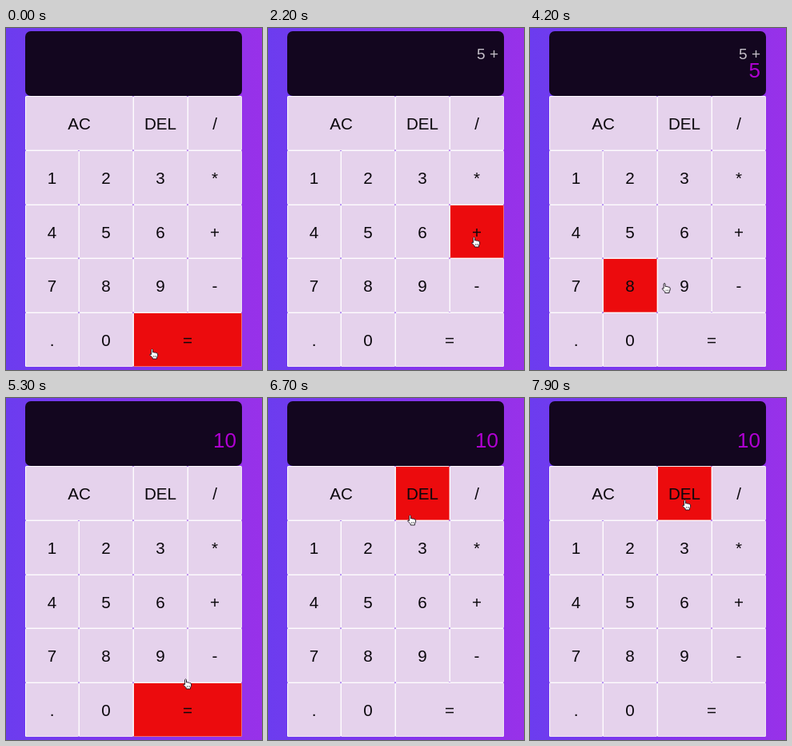
Recreate the animation shown at these times as an HTML page. Size 320 px wide and 428 px high, loop 8 s.

```html
<!DOCTYPE html>
<html lang="en">
<head>
<meta charset="utf-8">
<title>Calculator</title>
<style>
  html, body { margin: 0; width: 100%; height: 100%; overflow: hidden; }
  body {
    position: relative;
    background: linear-gradient(to right, #6c3cef, #9831e9);
    font-family: "Liberation Sans", Arial, sans-serif;
  }
  #screen {
    position: absolute; left: 24px; top: 4px; width: 271px; height: 81px;
    border-radius: 7px; background: #13061f;
  }
  #screen div { position: absolute; right: 7px; white-space: pre; line-height: 30px; }
  #prev { top: 14px; font-size: 19px; color: #c4bfc8; }
  #cur { top: 34px; font-size: 26px; color: #b000d2; }
  .key {
    position: absolute; box-sizing: border-box;
    border: 1px solid; border-color: #fffe #fff6 #fff6 #fffe; border-radius: 1.5px;
    background: #e5d2ec; color: #0b080c;
    font-size: 20.6px; line-height: 67px; text-align: center;
  }
  .key.hover { background: #ec0b0d; }
  #hand { position: absolute; left: 0; top: 0; width: 12px; height: 14px; overflow: visible; }
</style>
</head>
<body>
<div id="screen"><div id="prev"></div><div id="cur"></div></div>
<svg id="hand" viewBox="0 0 12 14">
  <path d="M2.6 1.6Q3.5 0 4.5 1.6V5Q5.6 4.2 6.4 5.2Q7.6 4.6 8.4 5.7Q10.4 5.2 10.6 7V9.4L9.5 11.4V13H4.2V11.7L.8 8.2Q.3 6.5 2.6 7.5Z"
    fill="#fff" stroke="#17101c" stroke-width=".9" stroke-linejoin="round"/>
  <path d="M5.4 9V11M7 9V11M8.6 9V11" stroke="#17101c" stroke-width=".5"/>
</svg>
<script>
const LOOP = 8000, STEP = 100, SIZE = 67.8, LEFT = 23.6, TOP = 84.95;
const $ = id => document.getElementById(id);

// Pointer stops: time, x, y of the fingertip
const stops = [
  [0, 182.5, 402.5], [1200, 137.5, 272.5], [2200, 257.5, 262.5], [3100, 80, 314],
  [3300, 96.5, 317.5], [3800, 128, 270], [4700, 224, 390], [5000, 224, 390],
  [5300, 224.5, 352.5], [6700, 177.5, 147.5], [7900, 193.5, 128.5]
];
const presses = [[1400, "5"], [2100, "+"], [3900, "5"], [4800, "="]];

const rows = ["AC AC DEL /", "1 2 3 *", "4 5 6 +", "7 8 9 -", ". 0 = ="].map(r => r.split(" "));
const edgeX = col => Math.round(LEFT + col * SIZE);
const edgeY = row => Math.round(TOP + row * SIZE);

const keys = {};
rows.forEach((row, y) => new Set(row).forEach(label => {
  const key = keys[label] = document.createElement("div");
  const x = edgeX(row.indexOf(label)), end = edgeX(row.lastIndexOf(label) + 1);
  key.className = "key";
  key.textContent = label;
  Object.assign(key.style, {
    left: x + "px", width: end - x + "px",
    top: edgeY(y) + "px", height: edgeY(y + 1) - edgeY(y) + "px"
  });
  document.body.insertBefore(key, $("hand"));
}));

const ease = k => k * k * (3 - 2 * k);

function tipAt(t) {
  const i = stops.findIndex(s => s[0] > t);
  if (i < 0) return stops[stops.length - 1].slice(1);
  const [t0, x0, y0] = stops[i - 1], [t1, x1, y1] = stops[i];
  const k = ease((t - t0) / (t1 - t0));
  return [x0 + (x1 - x0) * k, y0 + (y1 - y0) * k];
}

function displayAt(t) {
  let prev = "", cur = "";
  for (const [time, key] of presses) {
    if (time > t) break;
    if (key === "+") [prev, cur] = [cur + " +", ""];
    else if (key === "=") [prev, cur] = ["", String(parseFloat(prev) + parseFloat(cur))];
    else cur += key;
  }
  return [prev, cur];
}

function draw(t) {
  const [x, y] = tipAt(t);
  $("hand").style.transform = `translate(${x - 3.5}px, ${y - 1.5}px)`;

  // The highlight trails the pointer by one step.
  const [hx, hy] = tipAt(Math.max(0, t - STEP));
  const hot = rows[Math.floor((hy - TOP) / SIZE)][Math.floor((hx - LEFT) / SIZE)];
  for (const label in keys) keys[label].classList.toggle("hover", label === hot);

  [$("prev").textContent, $("cur").textContent] = displayAt(t);
}

const start = performance.now();
function tick() {
  const t = (performance.now() - start) % LOOP;
  draw(Math.floor(t / STEP) * STEP);
  requestAnimationFrame(tick);
}
tick();
</script>
</body>
</html>
```
